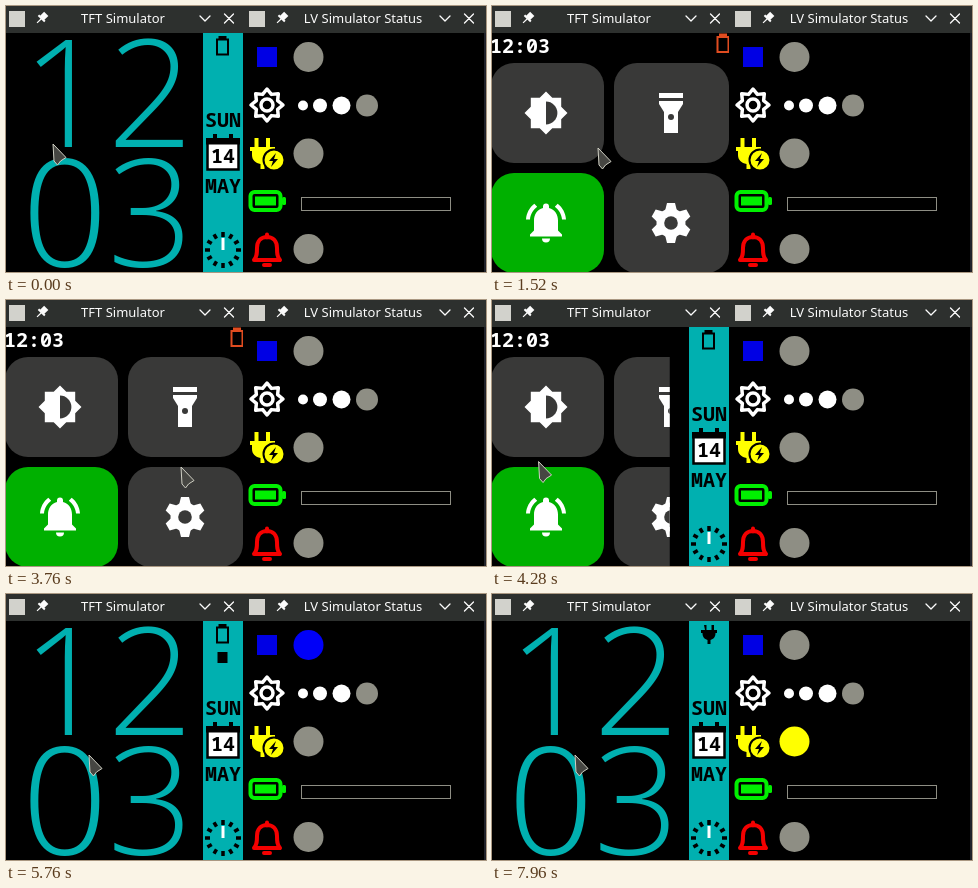
Write an HTML page that moves like this. It is 480 px wide and 266 px high and loops after 8000 ms.

```html
<!DOCTYPE html>
<html lang="en">
<head>
<meta charset="utf-8">
<title>Watch simulator</title>
<style>
  html, body { margin: 0; width: 100%; height: 100%; overflow: hidden; background: #000; }
  svg { display: block; width: 100vw; height: 100vh; }
  .title { font: 13px "Noto Sans", sans-serif; fill: #fcfcfc; text-anchor: middle; }
  .digits { font: 300 150px "Open Sans", sans-serif; fill: #00b0b0; }
  .mono { font: 700 20px "Noto Sans Mono", monospace; }
  .mid { text-anchor: middle; }
  .line { fill: none; stroke-linejoin: round; stroke-linecap: round; }
</style>
</head>
<body>
<svg viewBox="0 0 480 266" preserveAspectRatio="none">
  <defs>
    <clipPath id="wipe"><rect id="wipeRect" y="27" width="0" height="239"/></clipPath>
    <g id="bar">
      <rect width="240" height="27" fill="#2d302e"/>
      <rect x="3" y="5" width="16" height="16" fill="#d2d2cc"/>
      <g fill="#fcfcfc" transform="translate(36 12) rotate(45)">
        <rect x="-3" y="-6" width="6" height="6"/>
        <rect x="-4.500" y="-.5" width="9" height="2"/>
        <rect x="-.6" y="1" width="1.200" height="6"/>
      </g>
      <path class="line" stroke="#fcfcfc" stroke-width="1.300" d="M194 10l5 5 5-5M218.500 8l9 9m0-9l-9 9"/>
    </g>
    <g id="cell">
      <rect x="-5.500" y="-6" width="11" height="15" fill="none" stroke="currentColor" stroke-width="2"/>
      <rect x="-4" y="-9.500" width="8" height="3" fill="currentColor"/>
    </g>
    <path id="sun" d="M20 15.31L23.31 12 20 8.690V4h-4.690L12 .69 8.690 4H4v4.690L.69 12 4 15.31V20h4.690L12 23.31 15.31 20H20z"/>
  </defs>

  <rect width="480" height="266"/>
  <use href="#bar"/>
  <use href="#bar" x="240"/>
  <rect x="478" y="27" width="2" height="239" fill="#20222a"/>
  <text class="title" x="117" y="17">TFT Simulator</text>
  <text class="title" x="357" y="17">LV Simulator Status</text>

  <g id="face">
    <text class="digits" x="16" y="141">12</text>
    <text class="digits" x="16" y="260.500">03</text>
    <rect x="197" y="27" width="40" height="239" fill="#00b0b0"/>
    <use id="faceCell" href="#cell" x="216.500" y="39.500"/>
    <path id="facePlug" d="M212 31h2.500v5h5v-5h2.500v5h3v3h-1.500c0 4-2 6-5 7v4h-3v-4c-3-1-5-3-5-7h-1.500v-3h4z"/>
    <rect id="faceLink" x="211.500" y="58" width="10" height="11"/>
    <text class="mono mid" x="217" y="121">SUN</text>
    <rect x="201.500" y="133.500" width="31" height="30" fill="#fff" stroke="#000" stroke-width="2.500"/>
    <path d="M200 132h34v6.500h-34zM207 128h4v5h-4zM223 128h4v5h-4z"/>
    <text class="mono mid" x="217" y="157">14</text>
    <text class="mono mid" x="217" y="187">MAY</text>
    <g id="ticks" transform="translate(217 244)"></g>
    <path d="M217 232v12" stroke="#fff" stroke-width="3"/>
  </g>

  <g clip-path="url(#wipe)">
    <rect y="27" width="237" height="239"/>
    <text class="mono" x="-2" y="46.500" fill="#fff">12:03</text>
    <use href="#cell" x="231" y="37" color="#e04c20"/>
    <g fill="#393938">
      <rect x="-1" y="57" width="113" height="100" rx="23"/>
      <rect x="122" y="57" width="115" height="100" rx="23"/>
      <rect x="122" y="167" width="115" height="100" rx="23"/>
      <rect x="-1" y="167" width="113" height="100" rx="23" fill="#00b000"/>
    </g>
    <g fill="#fff">
      <g transform="translate(54 107) scale(1.9) translate(-12 -12)">
        <use href="#sun"/>
        <path id="sunHole" fill="#393938"/>
        <circle id="sunCore" cx="12" cy="12" r="4"/>
      </g>
      <path d="M167 87h24v5h-24zM167 95h24v3l-5 8v21h-14v-21l-5-8z"/>
      <circle cx="179" cy="111" r="3" fill="#393938"/>
      <g transform="translate(54 217) scale(2) translate(-12 -12.250)">
        <path d="M7.600 4.100L6.150 2.650C3.750 4.500 2.200 7.300 2 10.500h2C4.200 7.850 5.600 5.500 7.600 4.100zM20 10.500h2c-.2-3.200-1.750-6-4.150-7.850L16.400 4.100c2 1.400 3.400 3.750 3.600 6.400z"/>
        <path d="M18 11c0-3.100-1.600-5.600-4.500-6.300V4a1.500 1.500 0 0 0-3 0v.7C7.600 5.400 6 7.900 6 11v5l-2 2v1h16v-1l-2-2zM10 20h4a2 2 0 0 1-4 0z"/>
      </g>
      <g id="cog" transform="translate(179 217)"><circle r="14.500"/></g>
      <circle cx="179" cy="217" r="6.800" fill="#393938"/>
    </g>
  </g>

  <g id="status">
    <rect x="251" y="41" width="20" height="20" fill="#0000e4"/>
    <g class="line" stroke="#fff" stroke-width="3.500" transform="translate(261 99)">
      <path id="star"/>
      <circle r="6"/>
    </g>
    <g fill="#ffff00">
      <path d="M248.500 132h4v9h-4zM260 132h4v9h-4zM244 141h25v4h-2v4c0 6-4 8-8.500 9v5h-4v-5c-5-1-8.500-4-8.500-9v-4h-2z"/>
      <circle cx="268" cy="154" r="10.500" stroke="#000" stroke-width="2"/>
      <path fill="#000" d="M270 147l-7 8h4l-2 6 7-8h-4z"/>
    </g>
    <g fill="#00f000">
      <rect x="244.500" y="186" width="30" height="18" rx="4" fill="none" stroke="#00f000" stroke-width="4"/>
      <rect x="249" y="190.500" width="21" height="9"/>
      <rect x="276" y="191" width="4" height="8" rx="1.500"/>
    </g>
    <rect x="295.500" y="191.500" width="149" height="13" fill="none" stroke="#8e8e84"/>
    <path class="line" stroke="#f40000" stroke-width="4"
      d="M261 228.500v3M248 254c3-3 3-7 3-12 0-7 4-11 10-11s10 4 10 11c0 5 0 9 3 12zM258 259h6"/>
  </g>

  <path id="pointer" d="M0 0L1 17L4.500 21L7.500 17L13 13.500Z" fill="#464642" stroke="#d0d0c4" stroke-linejoin="round"/>
</svg>

<script>
const LOOP = 8000, STEP = 40, DIM = "#8e8e84";
const $ = id => document.getElementById(id);

function add(parent, tag, attrs) {
  const node = document.createElementNS("http://www.w3.org/2000/svg", tag);
  for (const key in attrs) node.setAttribute(key, attrs[key]);
  return parent.appendChild(node);
}

for (let i = 0; i < 12; i++) {
  add($("ticks"), "rect", { x: -1.75, y: -18, width: 3.5, height: 5, transform: `rotate(${i * 30})` });
}
for (let i = 0; i < 6; i++) {
  add($("cog"), "path", { d: "M-6.500-10L-4-20H4L6.500-10Z", transform: `rotate(${i * 60})` });
}
$("star").setAttribute("d", "M" + Array.from({ length: 16 }, (_, i) => {
  const angle = i * Math.PI / 8, r = i % 2 ? 11.5 : 16;
  return [r * Math.sin(angle), -r * Math.cos(angle)].map(v => v.toFixed(2));
}).join("L") + "Z");

const dot = (cx, cy, r) => add($("status"), "circle", { cx, cy, r, fill: DIM });
const link = dot(302.5, 51, 15), power = dot(302.5, 147.5, 15);
dot(302.5, 243, 15);
const levels = [[297, 5], [314, 7], [335.5, 9], [361, 11]].map(([x, r]) => dot(x, 99.5, r));

// Each row: time, then the values at that time.
const pointerPath = [
  [0, 47, 138], [560, 47, 138], [960, 140, 142], [1120, 132, 142], [1520, 106, 142],
  [1840, 64, 112], [2880, 64, 112], [3400, 150, 160], [3600, 190, 168], [3760, 175, 167],
  [4160, 50, 162], [4440, 42, 161], [4520, 42, 161], [5000, 83, 161], [LOOP, 83, 161]
];
const wipePath = [[0, 0], [1240, 0], [1400, 237], [4240, 237], [4400, 0], [LOOP, 0]];
const brightness = [[0, 2], [1920, 3], [2360, 1], [2800, 2]];
const linkOn = [[0, false], [5360, true], [6280, false]];
const powerOn = [[0, false], [7000, true]];

function tween(rows, t) {
  const i = rows.findIndex(row => row[0] > t), a = rows[i - 1], b = rows[i];
  const k = (t - a[0]) / (b[0] - a[0]);
  return a.slice(1).map((v, n) => v + (b[n + 1] - v) * k);
}
const held = (rows, t) => rows.filter(row => row[0] <= t).pop()[1];
const show = (node, on) => node.setAttribute("visibility", on ? "visible" : "hidden");
const paint = (node, color) => node.setAttribute("fill", color);

function draw(now) {
  const t = Math.floor(now % LOOP / STEP) * STEP;
  const [x, y] = tween(pointerPath, t);
  $("pointer").setAttribute("transform", `translate(${x} ${y})`);
  $("wipeRect").setAttribute("width", tween(wipePath, t)[0]);

  const level = held(brightness, t);
  levels.forEach((node, i) => paint(node, i <= level ? "#fff" : DIM));
  $("sunHole").setAttribute("d", level === 2 ? "M12 18V6a6 6 0 0 1 0 12z" : "M12 18a6 6 0 0 1 0-12a6 6 0 0 1 0 12z");
  show($("sunCore"), level === 3);

  const linked = held(linkOn, t), powered = held(powerOn, t);
  paint(link, linked ? "#0000f8" : DIM);
  paint(power, powered ? "#ffff00" : DIM);
  show($("faceLink"), linked);
  show($("facePlug"), powered);
  show($("faceCell"), !powered);
  requestAnimationFrame(() => draw(performance.now() - start));
}
const start = performance.now();
draw(0);
</script>
</body>
</html>
```
